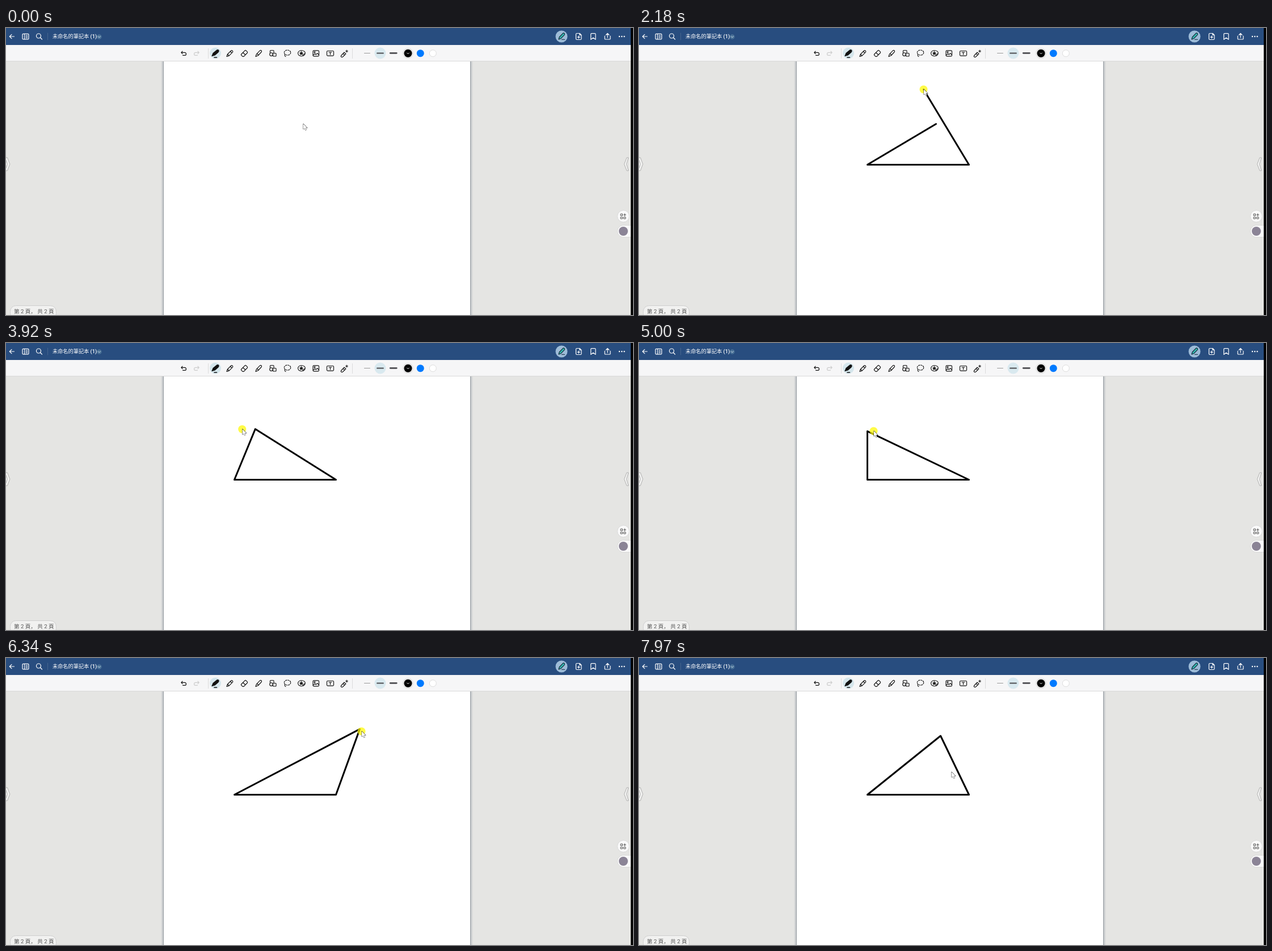
An HTML page with a canvas that plays this animation: 1105 px wide and 507 px high, repeating every 8 s.

```html
<!DOCTYPE html>
<html lang="zh-Hant">
<head>
<meta charset="utf-8">
<style>
  html, body { margin: 0; width: 1105px; height: 507px; overflow: hidden; background: #e5e5e3; }
  svg, canvas { position: absolute; left: 0; top: 0; }
  text { font-family: Roboto, "Noto Sans CJK TC", "Noto Sans CJK", sans-serif; }
  .icon { fill: none; stroke-linecap: round; stroke-linejoin: round; }
</style>
</head>
<body>
<svg width="1105" height="507" viewBox="0 0 1105 507">
  <defs>
    <linearGradient id="shade">
      <stop offset="0" stop-color="#e5e5e3"/><stop offset="1" stop-color="#b4b9be"/>
    </linearGradient>
  </defs>

  <!-- page -->
  <rect x="273" y="58" width="5" height="449" fill="url(#shade)"/>
  <rect x="-823" y="58" width="5" height="449" fill="url(#shade)" transform="scale(-1 1)"/>
  <rect x="277" y="58" width="542" height="449" fill="#9a9fa4"/>
  <rect x="278" y="58" width="540" height="449" fill="#fff"/>

  <!-- bars -->
  <rect width="1101" height="30" fill="#284d7f"/>
  <rect y="30" width="1101" height="28" fill="#f6f6f7"/>
  <path d="M0 58.5H1101" stroke="#d9d9d9"/>

  <!-- header -->
  <g class="icon" stroke="#fff" stroke-width="1.2">
    <path d="M14.5 15H6.5M10 11.3L6.3 15L10 18.7"/>
    <rect x="29" y="10.3" width="11" height="9.6" rx="1.5"/>
    <path d="M32.5 10.5V19.7M34.7 13H37.8M34.7 15.2H37.8M34.7 17.4H37.8" stroke-width="1"/>
    <circle cx="57.5" cy="14" r="4"/><path d="M60.5 17L63.5 20"/>
    <path d="M73.5 9V21" stroke="#46668f" stroke-width="1"/>
    <path d="M1011 9.5H1006Q1004.5 9.5 1004.5 11V19Q1004.5 20.5 1006 20.5H1012.5Q1014 20.5 1014 19V12.5L1011 9.5V12.5H1014M1009.3 14V18.2M1007.2 16.1H1011.4"/>
    <path d="M1030.7 20.3V11Q1030.7 9.7 1032 9.7H1037.7Q1039 9.7 1039 11V20.3L1034.9 17.2Z"/>
    <path d="M1055.2 14V19Q1055.2 20 1056.2 20H1064Q1065 20 1065 19V14M1060.1 17V9.8M1057.3 12.3L1060.1 9.5L1062.9 12.3"/>
  </g>
  <path d="M1081 15H1090" stroke="#fff" stroke-width="2.4" stroke-linecap="round" stroke-dasharray="0 4.3"/>
  <text x="82" y="18.2" font-size="9.2" font-weight="500" fill="#fff">未命名的筆記本 (1)</text>
  <circle cx="164.3" cy="15.5" r="4.3" fill="#4a7197"/>
  <path class="icon" d="M162.3 14.8L164.3 16.8L166.3 14.8" stroke="#d5e5ee"/>
  <circle cx="979" cy="15" r="10.5" fill="#9dbcd8"/>
  <g class="icon" stroke="#123" stroke-width="1.1">
    <path d="M974 20L975.2 16L981.5 9.3Q983 8.3 984.2 9.6Q985.2 11 984 12.3L977.8 18.7Z" fill="#35b9b1"/>
    <path d="M979.5 20.3H984.5"/>
  </g>

  <!-- toolbar -->
  <path d="M356.5 36V54M610.5 36V54" stroke="#dcdcdc"/>
  <circle cx="369" cy="44.5" r="10" fill="#d5e6ec"/>
  <circle cx="659.5" cy="44.5" r="10" fill="#d9e9ef"/>
  <g class="icon" stroke="#111" stroke-width="1.15">
    <path d="M311 41.2L308.8 43.4L311 45.6M309 43.4H315Q317.5 43.6 317.5 46Q317.5 48.3 315 48.3H311.5"/>
    <path stroke="#ccc" d="M338 41.2L340.2 43.4L338 45.6M340 43.4H334Q331.5 43.6 331.5 46Q331.5 48.3 334 48.3H337.5"/>
    <path fill="#111" d="M363 49.5L365 44.5L372 38.8Q374.5 38 375 40Q375.2 41.5 374 42.7L368 48Z"/>
    <path d="M367 52H371.5" stroke-width="1.5"/>
    <path d="M389 50.5L390.3 46.5L396.7 40Q398 39 399.3 40.3Q400.3 41.6 399.3 42.8L393 49.2ZM390.5 46.5L393 49M395.5 41.5L398 44"/>
    <path d="M414.5 46.5L421 39.8Q422 39 423 39.8L425.3 42.2Q426 43 425.2 44L419 50.3H417L414.5 47.9ZM417.5 43.5L422 47.5"/>
    <path d="M440 50.5L441.3 46.3L447.7 39.7Q449 38.9 450.2 40Q451 41.2 450 42.5L444.5 48.5ZM442.5 45.5L445.2 48"/>
    <rect x="465.5" y="39.5" width="6.5" height="6" rx="1"/><circle cx="467.5" cy="46.5" r="2.8" fill="#f6f6f7"/><rect x="470.5" y="44.5" width="5.5" height="5.5" rx="1" fill="#f6f6f7"/>
    <ellipse cx="496" cy="43.5" rx="5.7" ry="4.5" stroke-dasharray="2.3 1.7"/><path d="M491.8 46.8Q490.5 49.5 493 50.5"/>
    <path d="M514.5 44.5Q515 39.8 521 39.7Q527 40 527.3 44.5Q526.5 49.7 521 49.7Q515 49.5 514.5 44.5ZM523 49.3Q523.5 46.5 527 45"/>
    <path fill="#111" stroke-width=".5" d="M520.5 41.5L521.5 43.6L523.7 43.9L522.1 45.4L522.5 47.6L520.5 46.5L518.5 47.6L518.9 45.4L517.3 43.9L519.5 43.6Z"/>
    <rect x="541" y="39.8" width="10.5" height="10" rx="1.5"/><circle cx="544" cy="42.8" r=".9"/><path d="M541.3 48L544.5 45.3L546.5 47L548.5 44.5L551.3 47.3"/>
    <rect x="565.5" y="40.5" width="12" height="8.6" rx="1.5"/><path d="M569 43H574M571.5 43V47"/>
    <path d="M590.5 49L596 43L599 45.7L593.5 51Q592 52 590.8 51Q589.8 50 590.5 49ZM594 45.2L597 48"/>
    <path d="M600.5 39V43M598.5 41H602.5M599.2 39.7L601.8 42.3M601.8 39.7L599.2 42.3" stroke-width=".8"/>
  </g>
  <g stroke="#4c4c50" stroke-linecap="round">
    <path d="M631.5 44.5H641.5" stroke="#999"/>
    <path d="M654 44.5H665" stroke-width="1.8"/>
    <path d="M677.3 44.3H688.2" stroke-width="2.8"/>
  </g>
  <circle cx="708.5" cy="44.7" r="9.5" fill="#e4e4e4"/><circle cx="708.5" cy="44.7" r="7"/>
  <path class="icon" d="M706.7 44L708.5 45.8L710.3 44" stroke="#fff"/>
  <circle cx="730.3" cy="44.7" r="6.5" fill="#007aff"/>
  <circle cx="752.3" cy="44.7" r="6" fill="#fff" stroke="#ddd"/>

  <!-- side handles and floating buttons -->
  <g fill="#f2f2f1" stroke="#aaa" stroke-width=".9">
    <path d="M0 229H2.5L6.8 240.5L2.5 252H0M0 233.5L2.6 240.5L0 247.5"/>
    <path d="M1097 229H1094L1089.5 240.5L1094 252H1097L1093.5 240.5Z"/>
  </g>
  <g fill="#fafafa" stroke="#d4d4d4" stroke-width=".8">
    <circle cx="1088" cy="332.5" r="10.5"/>
    <path d="M1101 348.5H1088A10.5 10.5 0 0 0 1088 369.5H1101"/>
  </g>
  <path class="icon" stroke="#555" d="M1083.5 328.5h3v3h-3zM1083.5 334h3v3h-3zM1089 334h3v3h-3zM1090.5 328v4M1088.5 330h4"/>
  <circle cx="1088" cy="359" r="8" fill="#8b8496"/>

  <!-- page number -->
  <rect x="7.5" y="490.5" width="81" height="24" rx="10" fill="#f1f1f0" stroke="#cfcfcf"/>
  <text x="14" y="504.3" font-size="9.6" fill="#555" lang="zh-Hans" style="font-family: Roboto, 'Noto Sans CJK SC', sans-serif">第 2 頁， 共 2 頁</text>

  <rect x="1101" width="4" height="507"/>
</svg>
<canvas id="board" width="1105" height="507"></canvas>

<script>
const LOOP = 8000, STEP = 60, LAG = 60;
const PEN_DOWN = 60, SNAP = 2180, CLOSE = 3640, RELEASE = 7190, HALO_OFF = 7770;
const HOME = [523, 169], LEFT = [402, 241], RIGHT = [581, 241];
const UPRIGHT_SNAP = 14;

// Each move is a cubic curve from where the last one ended.
// Without a bend the handles sit on the ends, which eases in and out.
const moves = [];
function move(start, end, to, bend) {
  const from = moves.length ? moves[moves.length - 1].to : HOME;
  const [a, b] = bend || [from, to];
  moves.push({ start, end, from, a, b, to });
}
// Three pen strokes
move(60, 500, [404, 250], [[508, 170], [455, 213]]);
move(500, 890, [581, 232], [[440, 256], [510, 239]]);
move(900, 1580, [501, 108], [[574, 188], [533, 122]]);
const strokes = moves.slice();
// Dragging the corner
move(2700, 2900, [337, 148]);
move(2900, 3200, [686, 99]);
move(3200, 3500, [560, 150]);
move(3500, 4060, [389, 152]);
move(4060, 4280, [425, 158]);
move(4700, 5000, [413, 155]);
move(5000, 5540, [561, 344], [[680, 100], [690, 360]]);
move(5540, 6320, [626, 129], [[95, 330], [655, 92]]);
move(6600, 6950, [531, 137]);
move(7730, 7920, [550, 201]);

function along({ from, a, b, to }, u) {
  const v = 1 - u;
  return [0, 1].map(i =>
    v * v * v * from[i] + 3 * v * v * u * a[i] + 3 * v * u * u * b[i] + u * u * u * to[i]);
}
function pointer(t) {
  const m = moves.filter(m => m.start <= t).pop();
  return m ? along(m, Math.min(1, (t - m.start) / (m.end - m.start))) : HOME;
}

const ctx = document.getElementById('board').getContext('2d');
const arrow = new Path2D('M0 0V9.5L2.2 7.6L3.7 11L5.3 10.3L3.9 7H6.6Z');
ctx.lineCap = ctx.lineJoin = 'round';
ctx.translate(.5, .5);

function polyline(points, width, closed) {
  ctx.beginPath();
  points.forEach(p => ctx.lineTo(...p));
  if (closed) ctx.closePath();
  ctx.strokeStyle = '#000';
  ctx.lineWidth = width;
  ctx.stroke();
}

// The line is thin in the middle of a stroke and swells at both ends
function drawInk(t) {
  const pieces = 40;
  for (const s of strokes) {
    const drawn = Math.min(1, (t - LAG - s.start) / (s.end - s.start));
    for (let u = 0; u < drawn; u += 1 / pieces) {
      const width = 1.5 + 1.4 * Math.abs(2 * u - 1) ** 3;
      polyline([along(s, u), along(s, Math.min(u + 1 / pieces, drawn))], width);
    }
  }
}

function drawShape(t) {
  const apex = pointer(Math.min(t - LAG, RELEASE));
  const closed = t >= CLOSE;
  if (closed && Math.abs(apex[0] - LEFT[0]) < UPRIGHT_SNAP) apex[0] = LEFT[0];
  polyline([closed ? apex : HOME, LEFT, RIGHT, apex], 3, closed);
}

function drawPointer(t) {
  const [x, y] = pointer(t);
  if (t >= PEN_DOWN && t < HALO_OFF) {
    ctx.fillStyle = 'rgba(255, 250, 0, .72)';
    ctx.beginPath();
    ctx.arc(x, y, 7, 0, 7);
    ctx.fill();
  }
  ctx.save();
  ctx.translate(x + .5, y);
  ctx.fillStyle = '#fff';
  ctx.strokeStyle = '#222';
  ctx.stroke(arrow);
  ctx.fill(arrow);
  ctx.restore();
}

function frame(now) {
  const t = Math.floor((now % LOOP - 20) / STEP) * STEP + 20;
  ctx.clearRect(-1, -1, 1106, 508);
  if (t < SNAP) drawInk(t); else drawShape(t);
  ctx.lineWidth = .9;
  drawPointer(t);
  requestAnimationFrame(frame);
}
requestAnimationFrame(frame);
</script>
</body>
</html>
```
